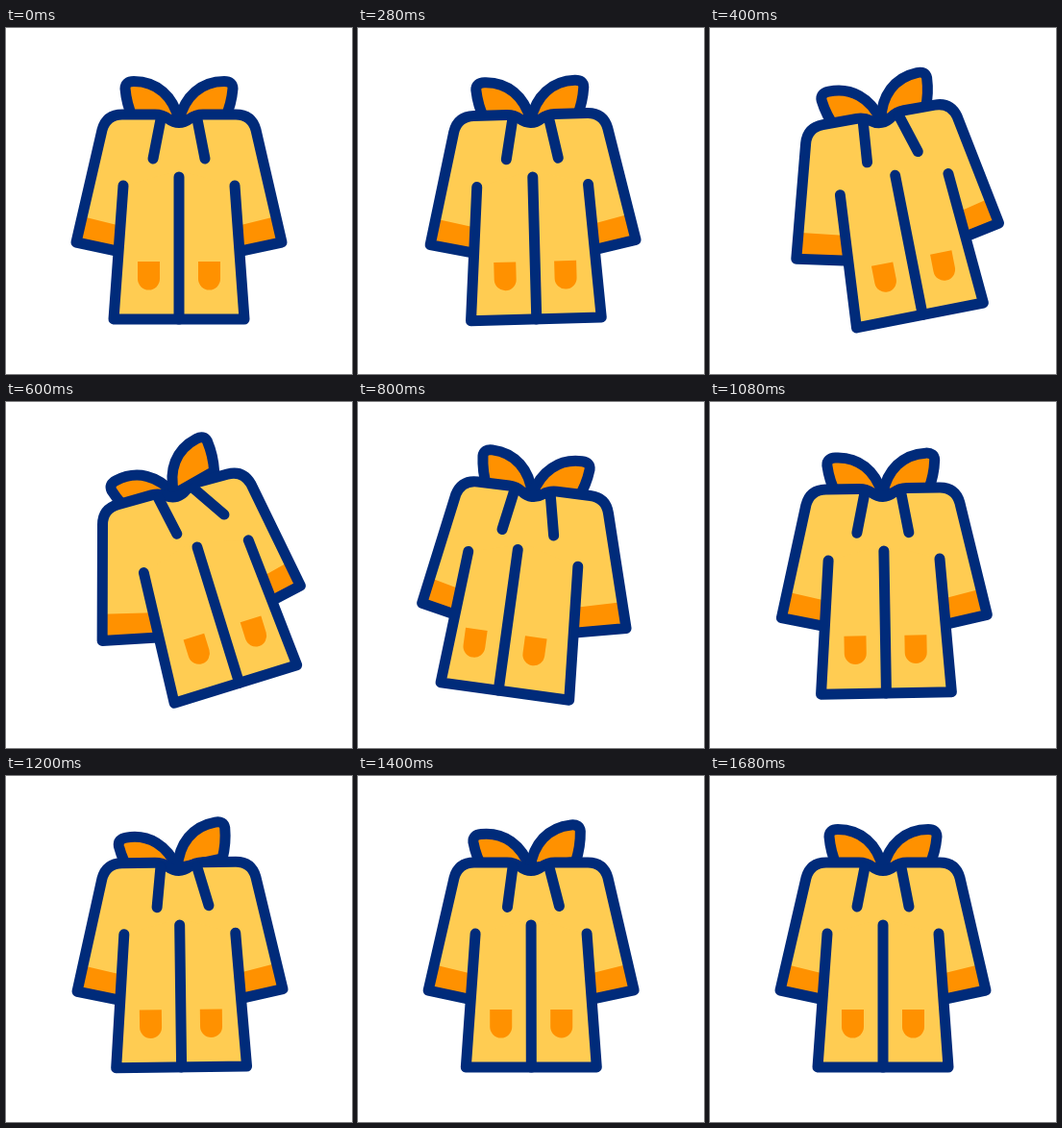
An HTML page for the animation above (1800 ms loop, 360 by 360 pixels).

```html
<!DOCTYPE html>
<html lang="en">
<head>
<meta charset="utf-8">
<title>Raincoat</title>
<style>
  html, body { margin: 0; width: 100%; height: 100%; overflow: hidden; background: #fff; }
  svg { display: block; width: 100vw; height: 100vh; }
  .line { fill: none; stroke: #002b7a; stroke-width: 11; stroke-linecap: round; stroke-linejoin: round; }
  .line.trim, .trim { fill: #ff9100; }
  .cloth { fill: #ffcc52; }
</style>
</head>
<body>
<svg viewBox="0 0 360 360">
  <defs>
    <path id="ear" class="line trim" d="M180 96C174 71 157 55.5 133 55.5Q124 55.5 124 63C125 75 128 85 132 94Z"/>
    <path id="cuff" class="trim" d="M79 196L140 211L134 236L73 223Z"/>
    <path id="pocket" class="trim" d="M137 243h23v18a11.5 11.5 0 0 1-23 0z"/>
  </defs>
  <g id="ears">
    <use href="#ear"/>
    <use href="#ear" transform="matrix(-1 0 0 1 360 0)"/>
  </g>
  <path id="cloth" class="cloth"/>
  <g id="cuffs">
    <use href="#cuff"/>
    <use href="#cuff" transform="matrix(-1 0 0 1 360 0)"/>
  </g>
  <path id="outline" class="line"/>
  <g id="panel">
    <path class="cloth" d="M122 164L180 148L238 164L248 303H112Z"/>
    <g id="front">
      <use href="#pocket"/>
      <use href="#pocket" x="63"/>
      <path class="line" d="M180 155V303"/>
    </g>
    <path class="line" d="M122 164L112 303H248L238 164"/>
  </g>
  <path id="cordL" class="line" d="M0 0L-8 41"/>
  <path id="cordR" class="line" d="M0 0L8 41"/>
</svg>
<script>
const LOOP = 1800, STEP = 40;

// Turning points in ms: the coat swings, the loose parts trail behind.
const SWING = [220, 550, 820, 1060, 1480];
const TRAIL = [220, 610, 855, 1220, 1620];

// Glides from rest through each extreme and back to rest.
function wave(t, times, ...extremes) {
  const poses = [0, ...extremes, 0];
  const i = times.findIndex(end => end > t);
  if (i < 1) return 0;
  const u = (t - times[i - 1]) / (times[i] - times[i - 1]);
  return poses[i - 1] + (poses[i] - poses[i - 1]) * (1 - Math.cos(Math.PI * u)) / 2;
}

// Returns a function that turns a point about (180, cy) and shifts it by dx.
function turn(deg, cy, dx) {
  const r = deg * Math.PI / 180, c = Math.cos(r), s = Math.sin(r);
  return (x, y) => [
    180 + dx + (x - 180) * c - (y - cy) * s,
    cy + (x - 180) * s + (y - cy) * c
  ].map(n => n.toFixed(2)).join(" ");
}

const $ = id => document.getElementById(id);
const place = (id, value) => $(id).setAttribute("transform", value);

function coatPath(arm, top, neck) {
  return `M${arm(134, 236)}L${arm(73, 223)}L${top(100, 106)}`
    + `C${top(103, 95)} ${top(110, 90)} ${top(121, 90)}`
    + `L${neck(155, 90)}C${neck(170, 90)} ${neck(168, 98.5)} ${neck(180, 98.5)}`
    + `C${neck(192, 98.5)} ${neck(190, 90)} ${neck(205, 90)}`
    + `L${top(239, 90)}C${top(250, 90)} ${top(257, 95)} ${top(260, 106)}`
    + `L${arm(287, 223)}L${arm(226, 236)}`;
}

function draw(t) {
  const swing = wave(t, SWING, -19.5, 8.2, -1);
  const fold = wave(t, SWING, 5, -7, 0);
  const cord = wave(t, TRAIL, -38.5, 12.5, -6);
  const ears = wave(t, TRAIL, -27.5, 12, -10);

  const lean = swing * 0.9;
  const armShift = Math.max(0, lean) / 2;
  const neck = turn(lean, 95, lean * 0.2);
  const d = coatPath(turn(lean, 136, armShift), turn(lean, 115, 0), neck);
  $("cloth").setAttribute("d", d + "Z");
  $("outline").setAttribute("d", d);
  place("cuffs", `translate(${armShift}) rotate(${lean} 180 136)`);

  const squeeze = 1 - Math.abs(swing) / 1000;
  place("panel", `translate(${180 + swing * 0.24} 90) rotate(${swing}) scale(${squeeze} 1) translate(-180 -90)`);
  place("front", `translate(${fold})`);
  place("ears", `translate(${ears * 0.2}) rotate(${ears} 180 95)`);
  place("cordL", `translate(${neck(161, 95)}) rotate(${cord})`);
  place("cordR", `translate(${neck(199, 95)}) rotate(${cord})`);
}

const start = performance.now();
function tick() {
  const t = (performance.now() - start) % LOOP;
  draw(Math.floor(t / STEP) * STEP);
  requestAnimationFrame(tick);
}
tick();
</script>
</body>
</html>
```
